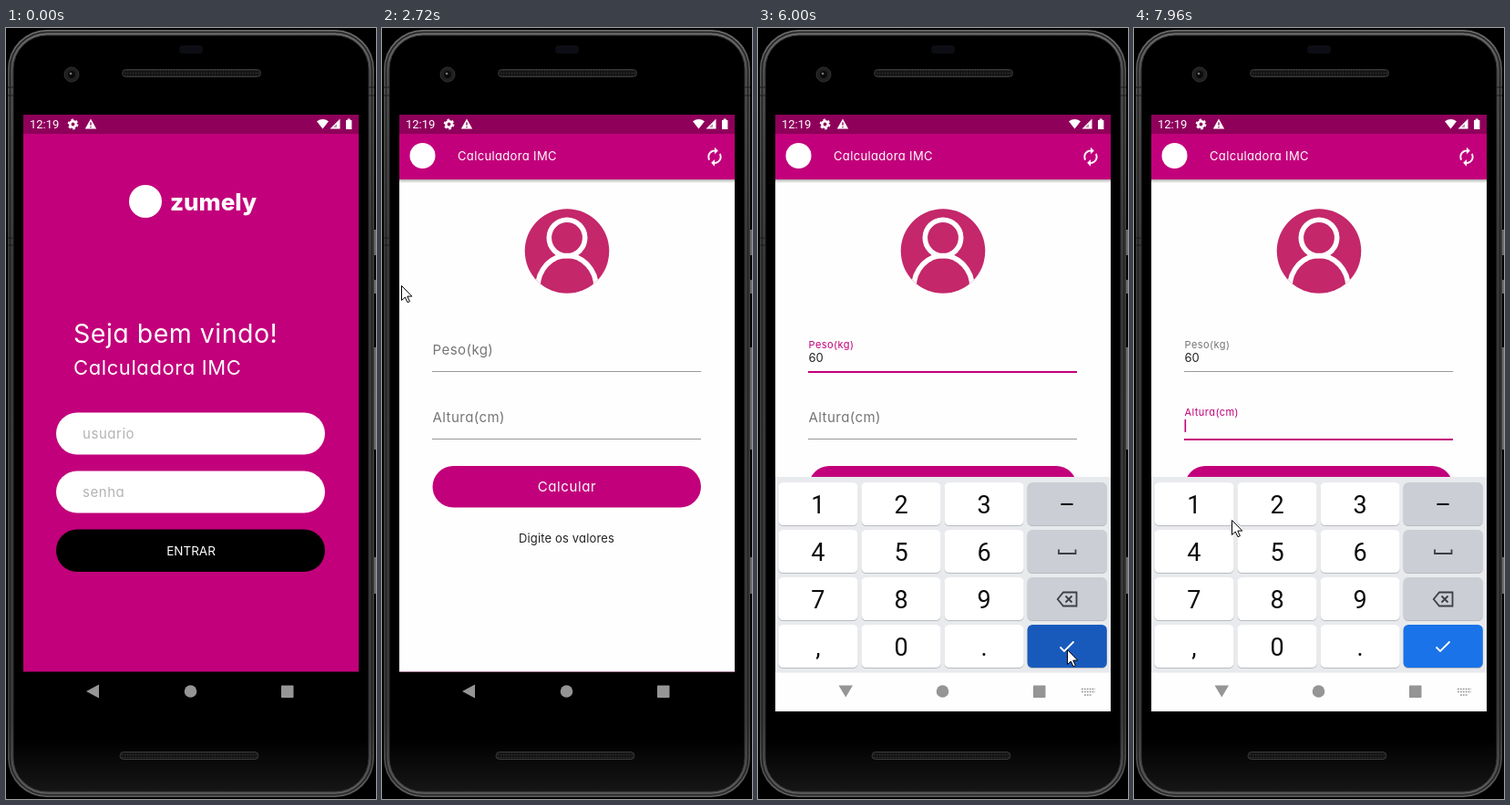
Write an HTML page that moves like this. It is 406x845 px and loops after 8 s.

```html
<!DOCTYPE html>
<html lang="pt">
<head>
<meta charset="utf-8">
<title>Calculadora IMC</title>
<style>
html, body { margin: 0; width: 100%; height: 100%; overflow: hidden; background: #000; }
svg { display: block; width: 100%; height: 100%; }
text { font-family: Inter, "Open Sans", sans-serif; font-feature-settings: "cv11", "ss01" 0; }
.roboto { font-family: Roboto, Arial, sans-serif; }
.mid { text-anchor: middle; }
.hint { font-size: 15px; letter-spacing: .55px; fill: #b3b3b3; }
.label { letter-spacing: .45px; }
.key-text { font: 27px Roboto, Arial, sans-serif; text-anchor: middle; fill: #0c0c0c; }
.icon { fill: none; stroke: #3c4043; stroke-width: 1.8; }
</style>
</head>
<body>
<svg viewBox="0 0 406 845">
  <defs>
    <clipPath id="screenClip"><rect x="19" y="95" width="368" height="654"/></clipPath>
    <clipPath id="buttonClip"><rect x="55" y="549.500" width="295" height="46.500" rx="23"/></clipPath>
    <clipPath id="avatarClip"><circle cx="203" cy="244.500" r="46.300"/></clipPath>
    <linearGradient id="rim" x2="0" y2="1">
      <stop offset="0" stop-color="#6c6c6c"/><stop offset=".06" stop-color="#505050"/>
      <stop offset=".3" stop-color="#3a3a3a"/><stop offset=".9" stop-color="#3c3c3c"/>
      <stop offset="1" stop-color="#5c5c5c"/>
    </linearGradient>
    <linearGradient id="shade" x2="0" y2="1">
      <stop offset="0" stop-opacity=".3"/><stop offset="1" stop-opacity="0"/>
    </linearGradient>
    <linearGradient id="chin" x2="0" y2="1">
      <stop offset=".93" stop-color="#000"/><stop offset="1" stop-color="#161616"/>
    </linearGradient>
    <pattern id="mesh" width="3" height="3" patternUnits="userSpaceOnUse">
      <rect width="3" height="3" fill="#141414"/><circle cx="1.5" cy="1.5" r=".8" fill="#303030"/>
    </pattern>
  </defs>

  <g id="phone">
    <rect width="406" height="845"/>
    <path d="M404.500 221v28M404.500 276v15M404.500 350v112M404.500 580v40" stroke="#6a6a6a" stroke-width="3"/>
    <rect x="2" y="2" width="402" height="841" rx="43" fill="url(#rim)"/>
    <rect x="4.500" y="4.500" width="397" height="836" rx="41" fill="none" stroke="#222" stroke-width="1.500"/>
    <rect x="8" y="8" width="390" height="829" rx="37" fill="url(#chin)" stroke="#303030"/>
    <path d="M2 65h6M2 74h6M2 230h6M2 238h6M398 65h6M398 74h6" stroke="#1c1c1c"/>
    <rect x="190" y="19" width="26" height="9" rx="4" fill="#0d0d15"/>
    <g fill="url(#mesh)" stroke="#3a3a3a">
      <rect x="127.500" y="45.500" width="152" height="8" rx="4"/>
      <rect x="125" y="793.500" width="152" height="8" rx="4"/>
    </g>
    <circle cx="72" cy="51" r="8" fill="#202020" stroke="#303030"/>
    <circle cx="72" cy="51" r="4" fill="#0b0b0d"/><circle cx="71" cy="50" r="1.300" fill="#777"/>
  </g>

  <g clip-path="url(#screenClip)">
    <g id="login">
      <rect x="19" y="116" width="368" height="589.500" fill="#c2007b"/>
      <circle cx="153" cy="190" r="18" fill="#fff"/>
      <g fill="#fff">
        <text x="180" y="200" font-size="26" font-weight="800">zumely</text>
        <text x="74" y="345" font-size="28.500" letter-spacing=".5">Seja bem vindo!</text>
        <text x="74" y="380" font-size="22" letter-spacing=".6">Calculadora IMC</text>
        <rect x="55" y="421.500" width="295" height="46" rx="23"/>
        <rect x="55" y="485.500" width="295" height="46" rx="23"/>
      </g>
      <text class="hint" x="84" y="450">usuario</text>
      <text class="hint" x="84" y="514">senha</text>
      <rect x="55" y="549.500" width="295" height="46.500" rx="23"/>
      <g clip-path="url(#buttonClip)"><circle id="ripple" cx="181.500" cy="580" fill="#191919"/></g>
      <text class="mid" x="203" y="578" font-size="13.500" fill="#fff">ENTRAR</text>
    </g>

    <g id="form">
      <rect x="19" y="116" width="368" height="589.500" fill="#fefefe"/>
      <rect x="19" y="166" width="368" height="4" fill="url(#shade)"/>
      <rect x="19" y="116" width="368" height="50" fill="#c2007b"/>
      <circle cx="44.500" cy="140" r="14" fill="#fff"/>
      <text x="83" y="145" font-size="13" letter-spacing=".35" fill="#fff">Calculadora IMC</text>
      <path transform="translate(353.600 129.800) scale(.95)" fill="#fff" d="M12 6v3l4-4-4-4v3c-4.420 0-8 3.580-8 8 0 1.570.46 3.030 1.240 4.260L6.700 14.800c-.45-.83-.7-1.790-.7-2.800 0-3.310 2.690-6 6-6zm6.760 1.740L17.300 9.200c.44.84.7 1.790.7 2.800 0 3.310-2.690 6-6 6v-3l-4 4 4 4v-3c4.420 0 8-3.580 8-8 0-1.570-.46-3.030-1.240-4.260z"/>
      <circle cx="203" cy="244.500" r="46.300" fill="#c4276a"/>
      <g clip-path="url(#avatarClip)" fill="none" stroke="#fff" stroke-width="5.600">
        <circle cx="203" cy="230" r="19.700"/>
        <ellipse cx="203" cy="284" rx="32" ry="34.500"/>
      </g>
      <g id="fields"></g>
      <rect x="55.500" y="480" width="294.500" height="45.500" rx="22.700" fill="#c2007b"/>
      <text class="mid" x="203" y="508" font-size="15" letter-spacing=".6" fill="#fff">Calcular</text>
      <text class="mid" x="202.500" y="564" font-size="13" letter-spacing=".15" fill="#222">Digite os valores</text>
    </g>

    <g id="status" fill="#fff">
      <rect x="19" y="95" width="368" height="21" fill="#8f005b"/>
      <text class="roboto" x="26" y="110" font-size="13">12:19</text>
      <circle cx="73.500" cy="105.500" r="3.200" fill="none" stroke="#fff" stroke-width="2.600"/>
      <circle cx="73.500" cy="105.500" r="5" fill="none" stroke="#fff" stroke-width="1.800" stroke-dasharray="2.600 2.636"/>
      <path d="M93 99.500l6.200 11H86.800z"/>
      <path d="M93 103.300v3.500M93 108v1.300" stroke="#8f005b" stroke-width="1.300"/>
      <path d="M341 102.200q6.500-4.600 13 0l-6.500 8.300zM366.500 99.500v11h-11zM373 101h1.700v-1.500h3V101h1.700v10H373z"/>
      <path d="M363 105v4h-4z" fill="#8f005b" opacity=".45"/>
    </g>

    <g id="keyboard">
      <rect x="19" y="706" width="368" height="60" fill="#fefefe"/>
      <rect x="19" y="492" width="368" height="214.500" fill="#e8eaed"/>
      <g id="keys"></g>
      <path class="icon" d="M330 571.500v4.500h18.500v-4.500"/>
      <path class="icon" d="M335 618.500h14.500v15H335l-6.200-7.500zM337.500 622.500l7 7M344.500 622.500l-7 7"/>
      <path class="icon" style="stroke:#fff" d="M331.500 678.500l4.500 4.500 10.500-10.500"/>
    </g>

    <g id="nav" fill="#959595">
      <path id="back"/>
      <circle cx="202.500" cy="727" r="6.800"/>
      <rect x="302" y="720.500" width="13.500" height="13.500" rx=".8"/>
      <path id="switcher" d="M355 724.500h15M355 727.500h15M358 731h8" fill="none" stroke="#919191" stroke-width="1.500" stroke-dasharray="1.700 1.200"/>
    </g>
  </g>

  <path id="pointer" d="M0 0V16L3.800 12.600 6.500 18.200 8.900 17.200 6.300 11.600H11.300Z" fill="#fff" stroke="#000"/>
</svg>

<script>
const LOOP = 8000, STEP = 70, PHASE = 50;
const PINK = '#c2007b', GREY = '#757575';
const $ = id => document.getElementById(id);
const clamp = v => Math.min(1, Math.max(0, v));
const between = (t, a, b) => t >= a && t < b;

function add(parent, tag, attrs, text = '') {
  const node = document.createElementNS('http://www.w3.org/2000/svg', tag);
  set(node, attrs);
  node.textContent = text;
  parent.appendChild(node);
  return node;
}
function set(node, attrs) {
  for (const name in attrs) node.setAttribute(name, attrs[name]);
}
function show(node, visible) {
  node.style.display = visible ? '' : 'none';
}

const keys = {};
['123–', '456_', '789<', ',0.✓'].forEach((row, r) => [...row].forEach((char, c) => {
  const x = 22.3 + c * 91.1, y = 498 + r * 52;
  const box = { x, y, width: 87.2, height: 47, rx: 5.5 };
  const fill = char === '✓' ? '#1a73e8' : c === 3 ? '#cbced5' : '#fff';
  add($('keys'), 'rect', { ...box, y: y + 1, fill: '#b8bbc0' });
  keys[char] = { fill, node: add($('keys'), 'rect', { ...box, fill }) };
  if (!'_<✓'.includes(char))
    add($('keys'), 'text', { x: x + 43.6, y: y + 34, class: 'key-text' }, char);
}));

const presses = [
  { char: '6', from: 4740, to: 4950, fill: '#d5d8dc' },
  { char: '0', from: 5330, to: 5480, fill: '#d5d8dc' },
  { char: '✓', from: 5930, to: 6140, fill: '#185abc' }
];

const fields = [
  { name: 'Peso(kg)', y: 377, focus: 3400, blur: 6850 },
  { name: 'Altura(cm)', y: 451.5, focus: 6850, blur: LOOP }
];
for (const f of fields) {
  const group = $('fields');
  f.line = add(group, 'rect', { x: 55, width: 295 });
  f.label = add(group, 'text', { x: 55.5, class: 'label' }, f.name);
  f.value = add(group, 'text', { x: 55.5, y: f.y - 11, 'font-size': 13, fill: '#222' });
  f.caret = add(group, 'rect', { y: f.y - 22.5, width: 1.6, height: 14, fill: PINK });
}

// time, x, y of the pointer tip
const route = [
  [730, 283, 811], [870, 238, 745], [1010, 208, 670], [1150, 190, 605], [1290, 183, 581],
  [2330, 183, 581], [2430, 130, 505], [2570, 25, 345], [2640, 2, 295], [2710, 21, 282],
  [2850, 60, 318], [3130, 91, 369], [4090, 91, 369], [4300, 165, 480], [4580, 246, 588],
  [4950, 246, 588], [5260, 156, 679], [5550, 156, 679], [5900, 339, 681], [6210, 339, 681],
  [6420, 225, 530], [6630, 135, 436], [6860, 135, 436], [7050, 150, 544], [7130, 150, 562],
  [7470, 150, 562], [7680, 128, 548], [7900, 107, 539], [LOOP, 107, 539]
];
function pointerAt(t) {
  const i = Math.max(1, route.findIndex(p => p[0] > t));
  const [t0, x0, y0] = route[i - 1], [t1, x1, y1] = route[i];
  const k = clamp((t - t0) / (t1 - t0));
  return [x0 + (x1 - x0) * k, y0 + (y1 - y0) * k];
}

function drawField(f, t, value) {
  const focused = between(t, f.focus, f.blur);
  const float = clamp((t - f.focus + STEP) / 210);
  set(f.line, { y: Math.floor(f.y) - 1, height: focused ? 2 : 1, fill: focused ? PINK : '#999' });
  set(f.label, {
    y: f.y - 19.2 - 7.3 * float,
    'font-size': 15 - 4 * float,
    fill: focused ? PINK : GREY
  });
  f.value.textContent = value;
  const typed = [f.focus, 4950, 5480].filter(s => s >= f.focus && s <= t).pop();
  show(f.caret, focused && (t - typed) % 1000 < 500);
  set(f.caret, { x: 55.5 + value.length * 8.1 });
}

function keyboardOffset(t) {
  const rise = start => 257 * (1 - clamp((t - start) / 196)) ** 3;
  if (t < 6140) return rise(3480);
  if (t < 6910) return 257 * clamp((t - 6140) / 210) ** 2;
  return rise(6910);
}

function draw(t) {
  const formAlpha = clamp((t - 1730) / 140);
  show($('form'), formAlpha > 0);
  $('form').style.opacity = formAlpha;
  set($('ripple'), { r: Math.max(0, (t - 1520) * .33) });

  drawField(fields[0], t, t < 4950 ? '' : t < 5480 ? '6' : '60');
  drawField(fields[1], t, '');

  const offset = keyboardOffset(t), open = offset < 257;
  show($('keyboard'), open);
  set($('keyboard'), { transform: `translate(0 ${offset})` });
  show($('switcher'), open);
  set($('back'), { d: open ? 'M88.500 720.500h15.500l-7.700 13z' : 'M88 727l14-7.500v15z' });
  for (const p of presses)
    set(keys[p.char].node, { fill: between(t, p.from, p.to) ? p.fill : keys[p.char].fill });

  show($('pointer'), t >= 730);
  set($('pointer'), { transform: `translate(${pointerAt(t).map(v => Math.round(v) + .5)})` });
}

const start = performance.now();
function tick(now) {
  const t = Math.max(0, now - start) % LOOP;
  draw(Math.floor((t - PHASE) / STEP) * STEP + PHASE);
  requestAnimationFrame(tick);
}
draw(0);
requestAnimationFrame(tick);
</script>
</body>
</html>
```
